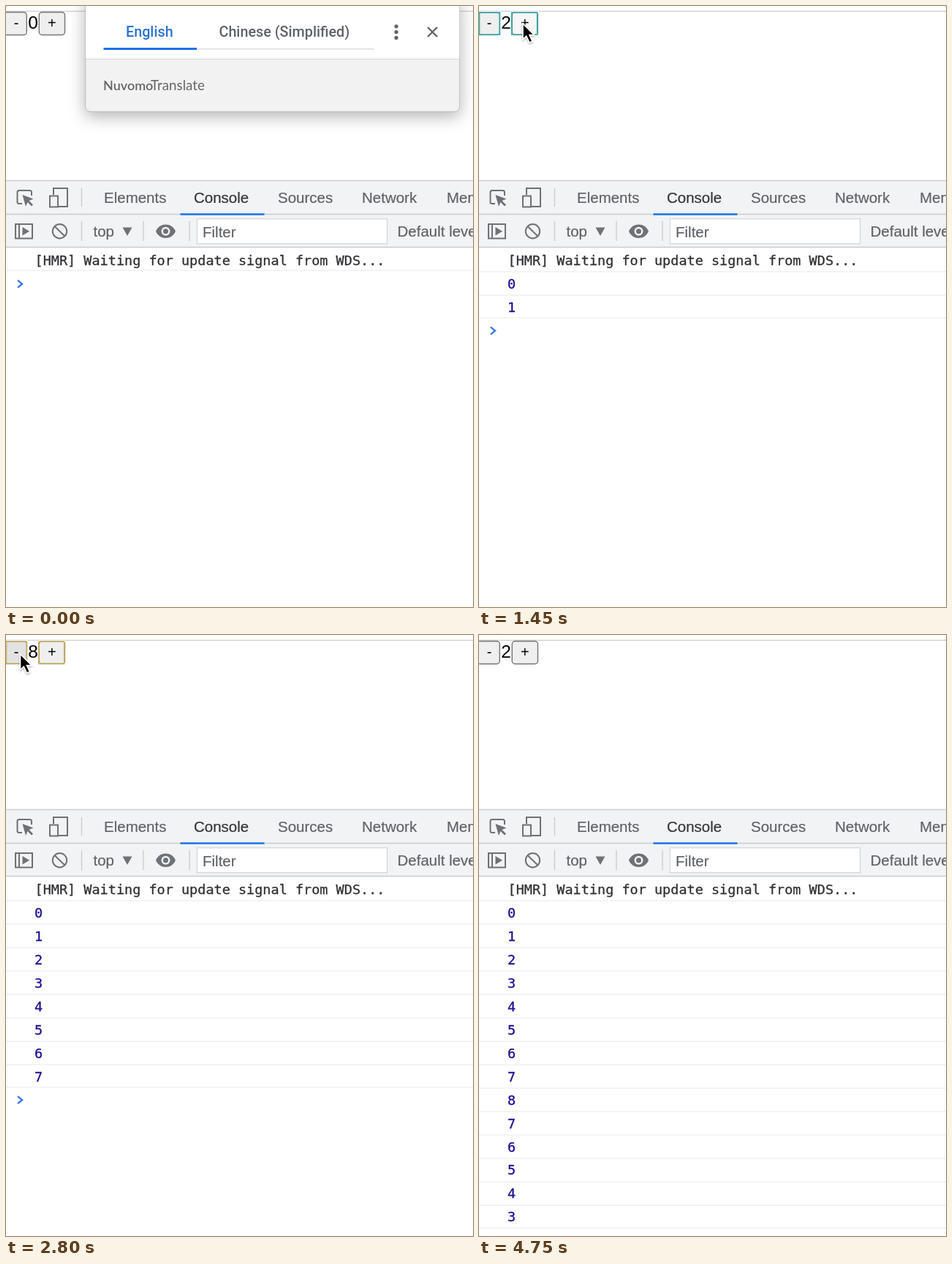
These frames come from a looping animation (639x821 px, 4.85 s). An HTML page:

```html
<!DOCTYPE html>
<html lang="en">
<head>
<meta charset="utf-8">
<title>Counter and console</title>
<style>
  html, body { margin: 0; width: 100%; height: 100%; overflow: hidden; background: #fff; }
  svg { display: block; width: 100%; height: 100%; }
  text { font: 20.5px "Liberation Sans", Arial, sans-serif; fill: #5f6368; stroke: #5f6368; stroke-width: .2; white-space: pre; }
  .mono { font: 18.5px "DejaVu Sans Mono", monospace; fill: #303134; stroke: #303134; stroke-width: .3; }
  .number { fill: #1a0f91; stroke: #1a0f91; }
  .popup text { font: 500 19.75px Roboto, sans-serif; stroke: none; }
  .popup .brand { font: 18.8px Lato, sans-serif; fill: #666; }
  .black { fill: #000; stroke: none; }
  .active { fill: #333639; stroke: #333639; }
  .rule { stroke: #f0f0f0; stroke-width: 1.5; }
  .button rect { stroke: #767676; stroke-width: 1.4; }
  .button text { font-size: 20px; text-anchor: middle; fill: #000; stroke: none; }
  .icon { fill: none; stroke: #6e7276; stroke-width: 2; }
  .solid { fill: #6e7276; }
</style>
</head>
<body>
<svg viewBox="0 0 639 821" preserveAspectRatio="none">
  <defs>
    <filter id="shadow" x="-20%" y="-30%" width="140%" height="170%">
      <feDropShadow dx="0" dy="6" stdDeviation="11" flood-opacity=".3"/>
    </filter>
    <filter id="soft" x="-50%" y="-50%" width="200%" height="200%">
      <feDropShadow dx="0" dy="1.5" stdDeviation="1.2" flood-opacity=".35"/>
    </filter>
  </defs>

  <path d="M0 7.2H639" stroke="#d4d4d4" stroke-width="1.5"/>
  <g class="button" id="minus">
    <rect x="-3" y="8.5" width="31.3" height="31" rx="4"/><text x="14" y="30">-</text>
  </g>
  <text id="count" class="black" x="30.3" y="31" style="font-size:24.5px">0</text>
  <g class="button" id="plus">
    <rect x="45.3" y="8.5" width="35.2" height="31" rx="4"/><text x="62.8" y="30">+</text>
  </g>
  <g id="rings" fill="none">
    <path d="M-1 7.5H29.8V40.5H-1M43.7 7.5H81.5V40.5H43.7Z" stroke="#f0f0f0"/>
    <path id="ring" d="M.5 9H28.4V39H.5ZM44.8 9H79.7V39H44.8Z" stroke-width="1.7"/>
  </g>

  <g class="popup" id="popup">
    <rect x="108.7" y="-12" width="512" height="156.3" rx="7" fill="#f2f2f2" stroke="#b9b9b9" filter="url(#shadow)"/>
    <path d="M109.3 0H620.2V72.5H109.3Z" fill="#fff"/>
    <path d="M109 72.5H620.5" stroke="#d6d6d6" stroke-width="1.2"/>
    <path d="M261 58.8H503.5" stroke="#dadce0" stroke-width="1.6"/>
    <path d="M133.5 58.5H261" stroke="#1a73e8" stroke-width="3"/>
    <text x="164" y="41.5" style="fill:#2b73d4">English</text>
    <text x="291.5" y="41.5">Chinese (Simplified)</text>
    <g fill="#5f6368"><circle cx="534" cy="27.8" r="2.6"/><circle cx="534" cy="35.6" r="2.6"/><circle cx="534" cy="43.4" r="2.6"/></g>
    <path d="M577 29L590 42M590 29L577 42" stroke="#5f6368" stroke-width="2.4"/>
    <text class="brand" x="133" y="115"><tspan font-weight="600" font-size="18">Nuvomo</tspan></text>
    <text class="brand" x="198" y="115">Translate</text>
  </g>

  <path d="M0 238.5H639V329.5H0Z" fill="#f1f3f4"/>
  <path d="M0 238.5H639M0 284.5H639M0 329.5H639" stroke="#c9ccd0" stroke-width="1.4"/>
  <path d="M103.5 249V274M103.5 294V321M188 294V321M251 294V321" stroke="#c8cbcf" stroke-width="1.3"/>
  <path d="M238.5 284.5H353.5" stroke="#1a73e8" stroke-width="2.4"/>
  <text x="134" y="268.5">Elements</text>
  <text class="active" x="257" y="268.5">Console</text>
  <text x="372" y="268.5">Sources</text>
  <text x="487" y="268.5">Network</text>
  <text x="603" y="268.5">Memory</text>
  <text x="119.5" y="315">top</text>
  <path class="solid" d="M159.5 302.5H172.5L166 314Z"/>
  <rect x="261.5" y="290.7" width="260" height="34" fill="#fff" stroke="#d5d8dc" stroke-width="1.3"/>
  <text x="269" y="316">Filter</text>
  <text x="535.5" y="315">Default levels</text>

  <path class="icon" d="M22 270H18Q15.500 270 15.500 267.5V254.5Q15.500 252 18 252H32.5Q35 252 35 254.5V259"/>
  <path class="solid" d="M22.5 258L37.5 263.5L31.5 266L37 271.5L35 273.5L29.5 268L27 274Z"/>
  <path class="icon" d="M65 258V249H84V274H72"/>
  <rect class="icon" x="60" y="259.5" width="11" height="15"/>
  <rect class="icon" x="13" y="298" width="23" height="19.5"/>
  <path class="icon" d="M18 298V317.5"/>
  <path class="solid" d="M22.5 302L32 307.7L22.5 313.5Z"/>
  <circle class="icon" cx="73.5" cy="307.7" r="9.7"/>
  <path class="icon" d="M66.5 301L80.5 314.5"/>
  <path class="solid" d="M205 307.7C210 295.5 227 295.5 232 307.7C227 320 210 320 205 307.7Z"/>
  <circle cx="218.5" cy="307.7" r="6" fill="#f1f3f4"/><circle class="solid" cx="218.5" cy="307.7" r="3.5"/>

  <text class="mono" x="39.5" y="354">[HMR] Waiting for update signal from WDS...</text>
  <g id="rows"></g>
  <path class="rule" id="lastRule" d="M0 0H639"/>
  <path id="prompt" d="M16 -5L22 0L16 5" fill="none" stroke="#3b78e7" stroke-width="2.4"/>
  <path id="cursor" d="M0 0V21.5L4.8 17L9 26L13 24.2L9 15.5H15.5Z" stroke="#fff" stroke-width="1.6" filter="url(#soft)"/>
</svg>

<script>
const LOOP = 4850, STEP = 50, ROW = 31.93, RULE = 32.05, HIGHLIGHT = 240;
const $ = id => document.getElementById(id);
const ringColors = ['#37afa9', '#63b19e', '#80b393', '#97b488', '#abb67d',
                    '#beb771', '#cfb965', '#dfba57', '#efbb49', '#febc38'];

// Each click: button held from .. until; the counter updates on release.
const clicks = [
  [900, 1050], [1200, 1300], [1450, 1500], [1600, 1700],
  [1800, 1900], [2000, 2050], [2200, 2300], [2400, 2450],
  [2950, 3100], [3200, 3250], [3400, 3500], [3600, 3700],
  [3800, 3900], [4150, 4200]
];
const PLUS_CLICKS = 8;
const counterAfter = n => n <= PLUS_CLICKS ? n : 2 * PLUS_CLICKS - n;

$('rows').innerHTML = clicks.map((_, i) => `<g>
  <path class="rule" d="M0 ${Math.round(362.5 + RULE * i)}H639"/>
  <text class="mono number" x="39" y="${Math.round(386.2 + ROW * i)}">${counterAfter(i)}</text></g>`).join('');
const rows = [...$('rows').children];

const show = (element, visible) => element.style.display = visible ? '' : 'none';
const place = (element, x, y) => element.setAttribute('transform', `translate(${x} ${y})`);

function glide(t, start, end, from, to) {
  const p = Math.min(1, Math.max(0, (t - start) / (end - start)));
  const eased = p * p * (3 - 2 * p);
  return from.map((v, i) => v + (to[i] - v) * eased);
}

function cursorAt(t) {
  if (t < 250 || t >= 4750) return null;
  if (t < 2600) return glide(t, 200, 750, [345, 368], [60, 24]);
  if (t < 4700) return glide(t, 2600, 2800, [60, 24], [19.5, 26]);
  return [12, 32];
}

// Updates that arrive while a highlight is visible extend it and warm its colour.
function highlightAt(t) {
  let expires = 0, level = 0;
  for (const [, release] of clicks) {
    if (release > t) break;
    if (release < expires) { level++; expires += HIGHLIGHT; }
    else { level = 0; expires = release + HIGHLIGHT; }
  }
  return t < expires ? ringColors[level] : null;
}

function paintButton(id, hovered, pressed) {
  const fill = hovered ? (pressed ? '#f6f6f6' : '#e2e2e2') : '#efefef';
  $(id).firstElementChild.setAttribute('fill', fill);
}

function render(now) {
  const t = Math.floor(now % LOOP / STEP) * STEP;
  const done = clicks.filter(([, release]) => release <= t).length;
  const pressed = clicks.some(([down, up]) => t >= down && t < up);
  const cursor = cursorAt(t), color = highlightAt(t);
  const over = (left, right) => !!cursor && cursor[1] < 30 &&
    cursor[0] > left && cursor[0] < right;

  $('count').textContent = counterAfter(done);
  paintButton('minus', over(0, 28), pressed);
  paintButton('plus', over(45, 81), pressed);
  show($('rings'), color);
  if (color) $('ring').setAttribute('stroke', color);
  show($('popup'), t < 900);

  rows.forEach((row, i) => show(row, i < done));
  place($('lastRule'), 0, Math.round(361.4 + RULE * done));
  place($('prompt'), 0, 379.7 + ROW * done);
  show($('cursor'), cursor);
  if (cursor) place($('cursor'), ...cursor);
}

const began = performance.now();
function frame() {
  render(performance.now() - began);
  requestAnimationFrame(frame);
}
frame();
</script>
</body>
</html>
```
